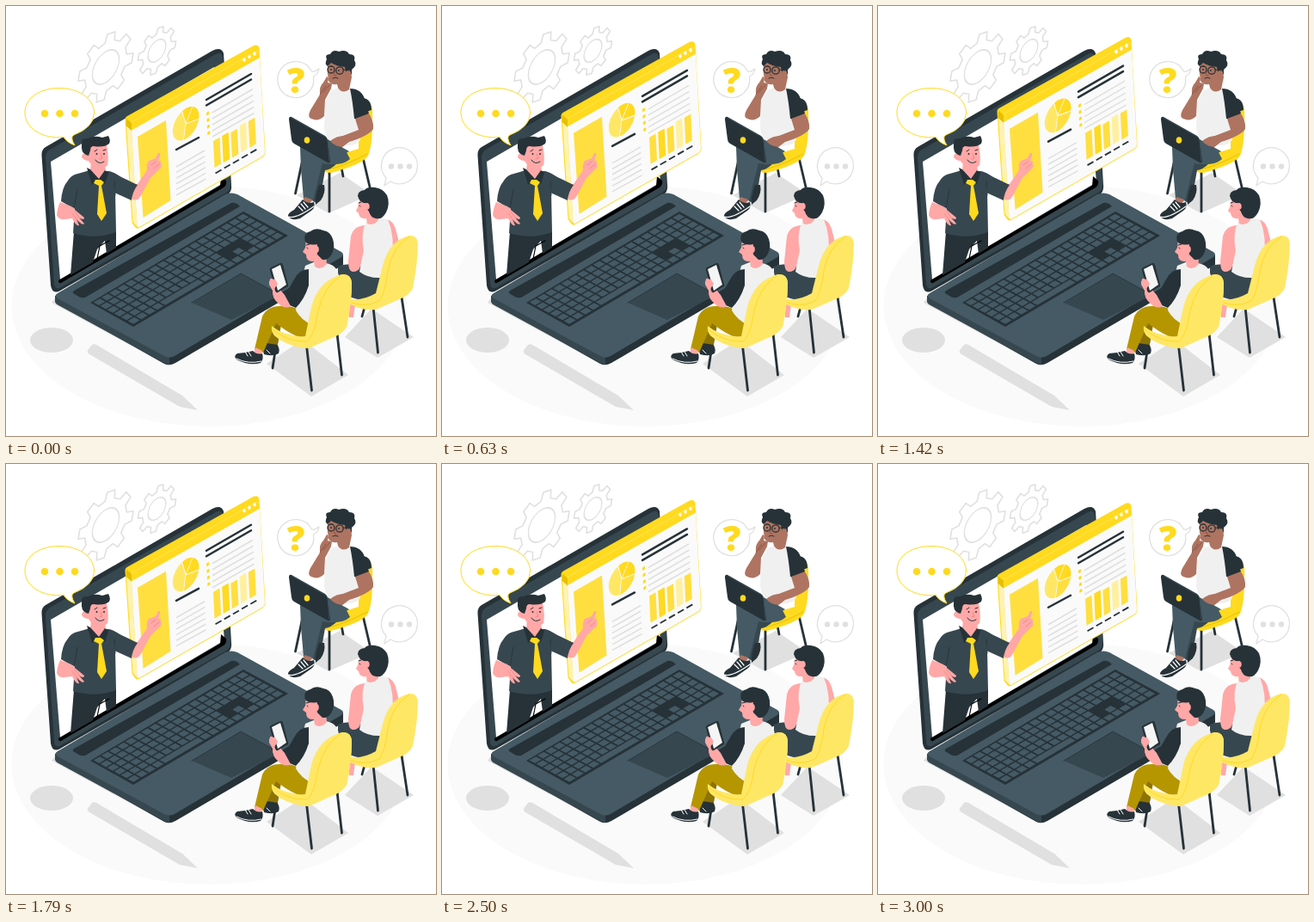
Recreate the animation shown at these times as an HTML page. Size 500 px wide and 500 px high, loop 3.04 s.

```html
<!DOCTYPE html>
<html lang="en">
<head>
<meta charset="utf-8">
<title>Online presentation</title>
<style>
html, body { margin: 0; width: 100%; height: 100%; overflow: hidden; background: #fff; }
svg { display: block; width: 100vw; height: 100vh; }
.k { fill: #263238; } .d { fill: #37474f; } .s { fill: #455a64; }
.y { fill: #ffda1f; } .l { fill: #ffe766; } .g { fill: #e0e0e0; }
.w { fill: #fff; } .o { fill: #f0f0f0; } .p { fill: #ffa8a7; } .b { fill: #ae7461; }
.line { fill: none; stroke-linecap: round; stroke-linejoin: round; }
.dark { stroke: #263238; } .grey { stroke: #e0e0e0; } .gold { stroke: #ffda1f; }
.skin { stroke: #ffa8a7; } .brown { stroke: #ae7461; }
</style>
</head>
<body>
<svg viewBox="0 0 500 500">
<ellipse cx="236.500" cy="349" rx="230" ry="140" fill="#fafafa"/>

<!-- shadows, mouse and pen -->
<g class="g">
  <path d="M53 345L184 416Q190 419 197 415L215 405 60 335Z"/>
  <ellipse cx="53" cy="388.500" rx="25" ry="14.500"/>
  <path d="M96 399L100 394Q103 392 107 395L205 453 223 470 202 466 97 405Q93 402 96 399Z"/>
  <path d="M338 220L375 241 425 219 388 194Z"/>
  <path d="M394 385L432 409 474 385 425 352Z"/>
  <path d="M303 416L355 454 398 429 345 388Z"/>
</g>

<g id="gears" class="grey" fill="#fff" stroke-width="1.600"></g>

<!-- laptop lid -->
<path class="k" d="M41.500 174Q41 167 46 164L240 52Q250 47 253 55L262 208Q263 216 257 220L63 331Q54 336 52 325Z"/>
<path class="d" d="M46 177Q46 170 51 167L244 56Q251 52 252 60L261 206Q262 213 256 217L64 327Q57 331 56 323Z"/>
<path d="M52 181L242 71 254 205 63 318Z" class="w"/>
<path d="M250 198L256 203Q257 208 253 211L64 322Q61 323 61 319L249 209Z"/>

<!-- laptop base -->
<path class="k" d="M57 337V344L184 416Q190 419 197 415L392 301V289Z"/>
<path class="d" d="M57 337V343Q57 346 61 348L184 415Q187 417 190 417V408Z"/>
<path class="s" d="M60 334L255 219Q262 216 269 219L390 286Q394 289 390 292L196 407Q190 410 184 407L60 340Q55 337 60 334Z"/>
<path class="k" d="M79 331L262 229Q266 228 270 231L272 233 92 339Q87 340 83 337L78 334Q77 332 79 331Z"/>
<path class="k" d="M98 345L276 239 328 267 148 373Z"/>
<g id="keys" class="s" transform="matrix(178 -105 50 27 98 345)"></g>
<path class="d" d="M216 345L273 311 319 336 262 365Z"/>
<path class="line dark" d="M216 345L273 311 319 336" stroke-width=".8"/>

<!-- presenter -->
<path class="k" d="M79 262L75 313 101 298 106 283Q112 276 115 273L117 288 128 281 128 262Z"/>
<path class="line" d="M106 294L109 279 120 273" stroke="#000" stroke-width="1.200"/>
<path class="d" d="M80 196Q91 193 97 191L120 192Q126 193 135 200L155 209 147 226Q134 220 127 215L128 263Q104 272 78 264L80 235 76 234 64 227Q65 211 72 203Q75 198 80 196Z"/>
<path class="line dark" d="M83 213L79 236M126 204L127 220" stroke-width=".8"/>
<path class="p" d="M99 181L98 192 108 202 116 193 115 183Z"/>
<path class="k" d="M94 188L98 190 108 201 115 191 119 194 115 207 108 202 100 208Z"/>
<path class="y" d="M104 202L110 202 114 205 111 209 117 241 111 250 106 242 108 209 102 206Z"/>
<path class="p" d="M93 164Q103 159 117 161Q120 176 118 185Q114 190 107 188Q99 186 96 180Q91 180 88 176Q88 171 93 172Z"/>
<path class="k" d="M93 173Q87 171 88 160Q87 153 95 154Q103 150 112 153L119 151Q122 156 120 160Q114 165 102 163Q98 163 98 168L96 174Z"/>
<path class="line dark" d="M103 169L106 167M113 168L116 167M104 179Q108 185 114 181" stroke-width="1"/>
<g class="k"><circle cx="105.500" cy="172" r="1"/><circle cx="114" cy="172" r="1"/></g>
<path class="line" d="M110 172L112 177 109 178" stroke="#e87f7b" stroke-width=".8"/>
<path class="p" d="M63 228L76 233 80 237 91 246Q91 250 85 246L91 253Q89 256 82 248L85 255Q82 257 77 247L68 248Q61 249 59 243Q60 234 63 228Z"/>
<path class="line" d="M80 239L85 246M77 241L82 248" stroke="#e87f7b" stroke-width=".6"/>

<!-- presenter's bubble -->
<path class="line gold" style="fill:#fff" d="M67 152.500C42 155 22 142 22 124S40 95.500 62 95.500 102.500 107 102.500 125Q102 141 79 150Q74 152 80 162Q71 159 67 152.500Z" stroke-width="1"/>
<g class="y"><circle cx="45" cy="125" r="4.300"/><circle cx="62.500" cy="125" r="4.300"/><circle cx="80" cy="125" r="4.300"/></g>

<!-- floating window -->
<g id="panel">
  <path class="y" d="M138.500 133Q138 130 141 128L288 46Q293 44 294.500 49L301.500 169Q302 173 298 176L155 258Q152 260 150 257L146.500 252Z"/>
  <path d="M140 139L146 145 152.500 257 147.500 251Z" fill="#fff3b0"/>
  <path d="M146 144.500L295 60 301 170Q301 173 298 175L155 257Q153 258 152.500 255Z" fill="#fafafa"/>
  <path d="M140 131L146 136V145L139.500 139Z" fill="#e6bf00"/>
  <path class="line" d="M146 135L290 53Q293 51 294 54" stroke="#ffe766" stroke-width=".8"/>
  <g class="w"><ellipse cx="277" cy="62.500" rx="1.700" ry="2.300"/><ellipse cx="283" cy="59" rx="1.700" ry="2.300"/><ellipse cx="289" cy="55.500" rx="1.700" ry="2.300"/></g>
  <path d="M153 152L186 133 191.500 226 159.500 246Z" fill="#ffdf40"/>
  <g transform="matrix(.866 -.5 0 1 209 137)">
    <circle r="17.500" fill="#ffe766"/>
    <path class="y" d="M0 0L-5 -17A17.500 17.500 0 0 1 17.500 3Z"/>
    <path d="M0 0L17.500 3A17.500 17.500 0 0 1 -3 17.200Z" fill="#ffdf40"/>
    <path d="M0 0L-5 -17M0 0L17.500 3M0 0L-3 17.200M0 0L9 -15" stroke="#fafafa"/>
  </g>
  <path class="line dark" d="M198 167L224 153M233 109L285 79M233 115.500L285 85.500" stroke-width="2.500"/>
  <g id="rows"></g>
</g>

<!-- pointing arm -->
<path class="p" d="M147 207L153 207 164 191Q163 184 166 180L174 177 177 171Q180 170 179 174L177 180Q181 179 180 184Q182 187 178 190L173 195 168 200 156 222Q153 227 147 225Z"/>
<path class="line" d="M169 185L174 181M172 189L178 184" stroke="#e87f7b" stroke-width=".7"/>
<path class="d" d="M128 196L153 208Q147 216 146 226L126 217Z"/>

<!-- question bubble -->
<path class="line grey" style="fill:#fff" d="M355.500 76Q359 77 364 73Q363 79 357.500 82A21 21 0 1 1 355.500 76Z" stroke-width="1.300"/>
<text x="337" y="100.500" text-anchor="middle" class="y" font-family="'Open Sans', sans-serif" font-size="41" font-weight="800">?</text>

<!-- listener with laptop -->
<path class="line dark" d="M345 178L336.500 218M376 190V239M414 172L425 219M390 188L392 198" stroke-width="2.800"/>
<path class="y" d="M410 108Q424 107 426 121Q427 160 421 174Q415 184 378 194Q367 194 362 186L370 178 410 166Z"/>
<path class="line" d="M366 189Q378 194 420 172" stroke="#e6bf00" stroke-width="1"/>
<path class="k" d="M415 107Q425 108 425 121L416 124Z"/>
<path class="d" d="M358 168L384 170 385 183Q378 190 371 191L365 225Q360 232 355 224Z"/>
<path class="s" d="M342 164Q348 160 366 166L394 166 400 178Q390 187 368 183L357 226Q351 228 346 224L343 190Z"/>
<path class="b" d="M347 222L356 225 352 232 345 228Z"/>
<path class="k" d="M345 225Q351 231 358 228Q360 235 355 238L342 247Q333 250 328 245Q327 241 335 237Z"/>
<path class="k" d="M364 208L370 208Q372 217 366 226L360 231Q359 222 364 208Z"/>
<path class="line" d="M328 245Q337 248 358 233M340 233L345 238M343 230L348 236M346 228L351 234" stroke="#fff" stroke-width="1.200"/>
<path class="o" d="M379 98L388 94 401 96Q411 102 411 120L412 156Q402 168 379 157Q371 152 370 142L371 112Z"/>
<path class="k" d="M400 96Q413 96 417 108L422 125Q415 132 405 131Q403 110 400 96Z"/>
<path class="b" d="M406 131L422 125Q428 135 427 143Q422 151 399 158L390 165Q382 167 376 158Q382 153 389 152L410 144Z"/>
<path class="b" d="M371 109L370 128Q363 135 355 131Q350 129 354 121L365 103Q364 93 369 89L373 82Q376 83 374 89L379 90 378 96Z"/>
<path class="b" d="M374 66Q384 61 400 65L402 83 399 97Q391 103 386 95L385 91Q378 92 375 87Q373 77 374 66Z"/>
<path class="k" d="M374 70Q370 67 373 62Q370 56 377 56Q380 50 387 53Q396 50 399 56Q407 56 405 63Q409 69 402 74L402 79 396 82 394 71Q384 70 378 66Z"/>
<ellipse cx="398" cy="79" rx="3.200" ry="4.500" class="b"/>
<g class="line dark" stroke-width="1.300"><circle cx="378" cy="74" r="4"/><circle cx="388" cy="75" r="4.200"/><path d="M392 74L399 75M380 84Q383 82 386 84" stroke-width="1"/></g>
<g class="k"><circle cx="378" cy="74" r="1"/><circle cx="387" cy="75" r="1"/></g>
<path class="line" d="M365 103L372 93M369 100L376 92M383 75L381 80 384 81" stroke="#7d4b3e" stroke-width=".7"/>
<path class="s" d="M365 176L376 182 399 169 374 155Z"/>
<path class="k" d="M332 129L371 151Q374 153 374 156L377 180Q377 183 374 182L335 160Q332 158 332 155L329 132Q329 128 332 129Z"/>
<path class="line" d="M332 130L371 152Q373 153 374 156L376 180" stroke="#455a64" stroke-width=".7"/>
<ellipse cx="350" cy="156" rx="3.300" ry="3.800" class="y"/>
<path class="b" d="M377 157Q384 151 393 151L402 153 392 163Q384 165 377 157Z"/>

<!-- grey bubble -->
<path class="line grey" style="fill:#fff" d="M447 204L440 209 442 200A21 21 0 1 1 447 204Z" stroke-width="1.300"/>
<g class="g"><circle cx="448" cy="186.500" r="3.200"/><circle cx="458.500" cy="186.500" r="3.200"/><circle cx="469" cy="186.500" r="3.200"/></g>

<!-- listener on the right -->
<path class="line dark" d="M417 350L414 361M427 350L432.500 403M459 332L467 385" stroke-width="2.800"/>
<path class="p" d="M399 343L406 347 404 362 399 362Z"/>
<path class="d" d="M386 303Q396 298 412 302L438 313 435 340Q421 346 399 338Q390 329 386 319Z"/>
<path class="p" d="M417 255Q404 256 401 268L398 297Q398 308 403 309Q410 309 412 303L417 284ZM443 248Q450 250 453 259L457 275 445 280Z"/>
<path class="o" d="M419 250Q432 245 444 248Q452 267 449 292L437 316Q421 317 411 309L416 284Q412 265 419 250Z"/>
<path class="p" d="M412 222L409 234 407 238 410 241Q411 248 419 247L420 253Q427 256 433 249L432 228Z"/>
<path class="k" d="M409 221Q409 215 417 214Q420 210 429 211Q438 212 443 220Q447 230 442 240Q437 249 430 247Q424 246 422 239L419 235 421 229Q412 231 409 221Z"/>
<ellipse cx="420" cy="233" rx="2.700" ry="3.800" class="p"/>
<path class="line dark" d="M410 229L413 228M411 232L412 233" stroke-width="1"/>
<path class="l" d="M396 340Q413 344 430 334L438 302Q446 272 469 267Q478 266 479 276Q479 297 473 328Q469 337 455 342L430 353Q416 355 401 347Q396 344 396 340Z"/>
<path class="line" d="M397 343Q416 352 434 343Q441 333 444 308Q449 280 469 268" stroke="#ffda1f" stroke-width="1"/>

<!-- listener with phone -->
<path class="line dark" d="M316 382L310 421M349 391L355.500 447M384 372L390.500 429" stroke-width="2.800"/>
<path class="k" d="M304 389L315 393Q319 399 317 404Q311 408 300 405L299 401Z"/>
<path d="M304 366L321 364 316 394 303 392Z" fill="#8c7300"/>
<path class="l" d="M309 372Q321 383 345 384L353 350Q361 318 391 312Q401 311 402 322Q402 346 396 373Q391 382 376 387L352 398Q327 396 312 383Q308 378 309 372Z"/>
<path d="M318 349Q330 347 344 355L360 369 355 386Q341 390 314 369L299 403 289 399 298 361Q304 349 318 349Z" fill="#b59600"/>
<path class="p" d="M290 397L298 401 296 407 288 404Z"/>
<path class="k" d="M287 401Q292 406 298 404Q300 411 296 415Q283 419 268 411Q264 407 269 404L278 403Z"/>
<path class="line" d="M268 410Q282 417 297 413M278 402L281 407M282 402L285 407M303 400L307 404" stroke="#fff" stroke-width="1"/>
<path class="o" d="M348 302L360 297 372 299Q385 301 387 314L383 344 356 371Q343 365 337 354L342 325Z"/>
<path class="k" d="M352 306Q341 306 335 318L324 337Q322 344 330 348L337 351Q347 341 352 325Z"/>
<path class="p" d="M324 336L331 349Q325 353 318 347Q309 340 310 331L306 324Q305 318 310 316L315 319 318 329Z"/>
<path class="k" d="M308 304L319 299Q321 298 322 301L328 324Q329 326 326 327L316 333Q314 334 313 331L307 307Q306 305 308 304Z"/>
<path d="M309 306L319 301 326 324 316 331Z" fill="#f5f5f5"/>
<path class="p" d="M307 317L313 318 316 323 312 329 307 325Z"/>
<path class="p" d="M349 270L348 281 345 286 349 289Q349 298 358 297L359 303Q366 308 373 300L371 276Z"/>
<path class="k" d="M348 274Q345 264 354 262Q360 257 369 261Q377 262 380 271Q383 280 379 288Q375 296 368 295L362 289 361 283 362 277Q352 279 348 274Z"/>
<ellipse cx="361" cy="283" rx="2.800" ry="4" class="p"/>
<path class="line dark" d="M349 278L353 277M350 281L351 282" stroke-width="1"/>
<path class="l" d="M348 384L355 350Q363 319 391 312Q401 311 402 322Q402 346 396 373Q391 382 376 387L352 398Q327 396 312 383Q308 378 309 372Q325 386 348 384Z"/>
<path class="line" d="M310 376Q327 391 350 390Q359 383 363 354Q370 325 390 313" stroke="#ffda1f" stroke-width="1"/>
</svg>
<script>
const svgNS = 'http://www.w3.org/2000/svg';
const byId = id => document.getElementById(id);
function add(parent, tag, attrs) {
  const el = document.createElementNS(svgNS, tag);
  for (const name in attrs) el.setAttribute(name, attrs[name]);
  byId(parent).append(el);
}

// Isometric gear with eight teeth and a round hole
function gear(cx, cy, radius, hole) {
  const points = [];
  for (let i = 0; i < 8; i++) {
    for (const [offset, scale] of [[-.3, .76], [-.18, 1], [.18, 1], [.3, .76]]) {
      const a = (i + offset) * Math.PI / 4 + .2, r = radius * scale;
      const x = r * Math.cos(a);
      points.push([cx + .866 * x, cy + r * Math.sin(a) - .5 * x]);
    }
  }
  add('gears', 'path', { d: 'M' + points.join('L') + 'Z', 'stroke-linejoin': 'round' });
  add('gears', 'circle', { r: hole, transform: `matrix(.866 -.5 0 1 ${cx} ${cy})` });
}
gear(116, 71, 37, 18);
gear(175.5, 52, 25.5, 12);

// Keyboard in unit coordinates
function key(x, y, width, height = .13) {
  add('keys', 'rect', { x, y, width, height });
}
for (let row = 0; row < 6; row++) {
  const y = .03 + row * .16;
  for (let col = 0; col < 19; col++) {
    const x = .012 + col * .052;
    const arrows = col > 12 && col < 16;
    const space = row === 5 && col > 3 && col < 9;
    if (space || arrows && (row === 3 || row === 4 && col !== 14)) continue;
    key(x, y, .042);
  }
}
key(.22, .83, .25);

// Window text, bullets and chart
function line(x, y, dx, dy, color, width) {
  add('rows', 'path', { d: `M${x} ${y}l${dx} ${dy}`, stroke: color, 'stroke-width': width });
}
for (let i = 0; i < 6; i++) line(198, 187 + i * 6.6, 33 + i * .3, -19, '#e0e0e0', 1.6);
for (let i = 0; i < 5; i++) {
  line(240, 124 + i * 7, 47 + i * .4, -27.5, '#e0e0e0', 1.6);
  if (i < 4) add('rows', 'path', { class: 'y', d: `M${233 + i * .4} ${124 + i * 7.6}l3 -1.700 .2 3.500 -3 1.700z` });
}
const tops = [157, 151, 147, 139, 134];
tops.forEach((top, i) => {
  const x = 241 + i * 10.2, base = 188 - i * 5.8;
  add('rows', 'path', {
    d: `M${x} ${top}L${x + 7.5} ${top - 4.3}L${x + 9} ${base - 4.5}L${x + 1.5} ${base}Z`,
    fill: i === 3 ? '#fff0a0' : i % 2 ? '#ffda1f' : '#ffdf40'
  });
  line(x + 2.5, 194.5 - i * 5.9, 7, -4, '#263238', 1.8);
});

const loop = 3040, lift = 10;
function draw(now) {
  const phase = now % loop / loop;
  const y = -lift * (1 - Math.abs(1 - 2 * phase));
  byId('panel').setAttribute('transform', `translate(0 ${y})`);
  requestAnimationFrame(draw);
}
const start = performance.now();
draw(0);
function tick() { draw(performance.now() - start); }
draw = (now => {
  const phase = now % loop / loop;
  const y = -lift * (1 - Math.abs(1 - 2 * phase));
  byId('panel').setAttribute('transform', `translate(0 ${y})`);
  requestAnimationFrame(tick);
});
</script>
</body>
</html>
```
